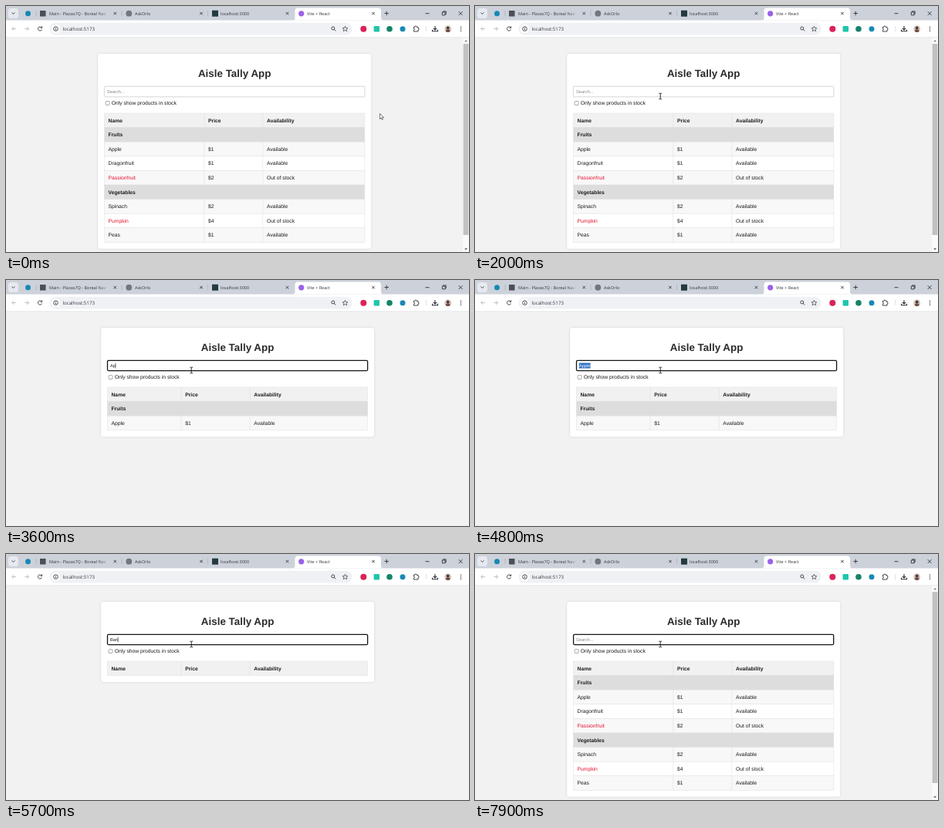
An HTML page that plays this animation: 600x319 px, repeating every 8 s.

```html
<!DOCTYPE html>
<html lang="en">
<head>
<meta charset="utf-8">
<title>Aisle Tally App</title>
<style>
  html, body { margin: 0; width: 100%; height: 100%; overflow: hidden; background: #f2f2f2; }
  svg { display: block; width: 600px; height: 319px; }
  text { font: 6.75px "Liberation Sans", Arial, sans-serif; fill: #1c1c1c; text-rendering: geometricPrecision; white-space: pre; }
  .ui { font: 5.5px "Open Sans", "Noto Sans", sans-serif; fill: #33363b; }
  .url { font-size: 6.15px; }
  .bold { font-weight: 700; }
  .title { font-size: 13.4px; font-weight: 700; fill: #2b2b2b; text-anchor: middle; }
  .field { font-size: 5.6px; }
  .hint { fill: #858585; }
  .out { fill: #e2142f; }
  .line { fill: none; stroke: #303338; stroke-width: .9; }
  .card { fill: #fff; filter: drop-shadow(0 0 1.6px rgba(0, 0, 0, .13)); }
</style>
</head>
<body>
<svg viewBox="0 0 600 319">
  <rect width="600" height="319" fill="#f2f2f2"/>
  <g id="page"></g>
  <g id="scrollbar">
    <path d="M592 41h8v278h-8z" fill="#fafafa"/>
    <path d="M592.6 49h6.8v248h-6.8z" fill="#c1c1c1"/>
    <path d="M594.3 46.2l1.8-2.2 1.8 2.2z" fill="#777"/>
    <path d="M594.3 314.3l1.8 2.2 1.8-2.2z" fill="#555"/>
  </g>
  <g id="chrome">
    <path d="M0 0h600v19H0z" fill="#cdd1da"/>
    <path d="M0 18.5h600V41H0z" fill="#fff"/>
    <path d="M0 40.7h600" stroke="#d9dbdf" stroke-width=".6"/>
    <path d="M371 18.6q3.5 0 3.5-3.6V6q0-3.5 3.5-3.5h104.500q3.500 0 3.500 3.500v9q0 3.600 3.500 3.600z" fill="#fff"/>
    <rect x="3" y="3" width="13" height="13" rx="3.6" fill="#e6e9ef"/>
    <path class="line" d="M7.500 8.500l2 2 2-2"/>
    <path d="M39 6v7M150 6v7M261.500 6v7" stroke="#a4a9b3" stroke-width=".6"/>
    <circle cx="28.500" cy="9.700" r="3.500" fill="#1689b5"/>
    <rect x="44" y="6" width="7.500" height="7.500" fill="#4b4f58"/>
    <circle cx="159.300" cy="9.700" r="3.900" fill="#72767d"/>
    <rect x="267" y="5.700" width="8" height="8" fill="#233b40"/>
    <circle cx="382.700" cy="9.800" r="3.600" fill="#9a62e8"/>
    <text class="ui" x="167" y="11.700">AskOrlo</text>
    <text class="ui" x="278" y="11.700">localhost:3000</text>
    <text class="ui" x="390" y="11.700">Vite + React</text>
    <text class="ui" x="56" y="11.700" style="fill:url(#fade)">Main - Plazas7Q - Boreal Nav</text>
    <linearGradient id="fade" gradientUnits="userSpaceOnUse" x1="118" x2="135">
      <stop stop-color="#33363b"/><stop offset="1" stop-color="#33363b" stop-opacity=".1"/>
    </linearGradient>
    <g id="closers"></g>
    <path class="line" d="M490.500 9.500h5.400M493.200 6.800v5.400"/>
    <path class="line" d="M543.500 9.700h5M565.300 8h3.800v3.800h-3.800zM566.500 8V6.900h3.700v3.700h-1M586.700 7.200l4.800 4.800M591.500 7.200l-4.800 4.800"/>
    <path class="line" style="stroke:#b9bcc1" d="M13 29.500H7.800M10.300 27l-2.500 2.500 2.500 2.500M24.300 29.500h5.200M27 27l2.500 2.500-2.500 2.500"/>
    <path class="line" d="M46.200 28a2.600 2.600 0 1 0 .3 2.400M46.700 26.400v2h-2"/>
    <rect x="56.500" y="21.800" width="392" height="15.800" rx="7.900" fill="#eff1f5"/>
    <circle cx="64.500" cy="29.600" r="5.700" fill="#fff"/>
    <circle class="line" cx="64.500" cy="29.600" r="2.800"/>
    <path class="line" d="M64.500 29.200v1.900M64.500 27.800v.6"/>
    <text class="ui url" x="73.500" y="31.900">localhost:5173</text>
    <circle class="line" cx="423.800" cy="28.900" r="2"/>
    <path class="line" d="M425.200 30.300l2.100 2.100"/>
    <path class="line" style="stroke-width:.7" d="M439.500 26.300l1 2.200 2.400.2-1.800 1.600.6 2.400-2.200-1.300-2.200 1.300.6-2.400-1.800-1.600 2.400-.2z"/>
    <circle cx="463.300" cy="29.700" r="4" fill="#dc2158"/>
    <rect x="476.600" y="26" width="7.400" height="7.400" rx=".8" fill="#20c6ac"/>
    <circle cx="497" cy="29.700" r="3.800" fill="#15836b"/>
    <circle cx="514" cy="29.700" r="3.500" fill="#1689b5"/>
    <path class="line" d="M528.300 27.200h1.700q0-1.300 1-1.300t1 1.300h2v1.800q1.200 0 1.200 1t-1.200 1v2h-5.700v-1.700q1.200 0 1.200-1.100t-1.200-1.100z"/>
    <path d="M544.500 26v7" stroke="#cbd6ec" stroke-width=".7"/>
    <path class="line" style="stroke-width:1.100" d="M556 26v4.800M553.800 28.800l2.200 2.200 2.200-2.200M552.500 30.800v2h7v-2"/>
    <clipPath id="round"><circle cx="572.700" cy="29.700" r="4.400"/></clipPath>
    <g clip-path="url(#round)">
      <path d="M568 25h10v10h-10z" fill="#cfc6bf"/>
      <circle cx="572.700" cy="28.400" r="1.900" fill="#51372f"/>
      <ellipse cx="572.700" cy="33.500" rx="3" ry="3.300" fill="#704b43"/>
    </g>
    <g fill="#303338"><circle cx="589.500" cy="27.200" r=".7"/><circle cx="589.500" cy="29.700" r=".7"/><circle cx="589.500" cy="32.200" r=".7"/></g>
  </g>
  <g id="pointer">
    <path id="arrow" d="M0 0v7l1.600-1.500 1.100 2.500 1.200-.5-1.100-2.400h2.200z" fill="#fff" stroke="#222" stroke-width=".6"/>
    <path id="beam" d="M-1.800-3.800h1.300l.5.500.5-.5h1.300M0-3.300v6.600M-1.800 3.800h1.300l.5-.5.500.500h1.300" fill="none" stroke="#111" stroke-width=".9"/>
  </g>
</svg>
<script>
const LOOP = 8000, FOCUS = 2600, ROW = 18.6, TOP = 139;
const $ = id => document.getElementById(id);

const stock = [
  ["Fruits", [["Apple", 1, true], ["Dragonfruit", 1, true], ["Passionfruit", 2, false]]],
  ["Vegetables", [["Spinach", 2, true], ["Pumpkin", 4, false], ["Peas", 1, true]]]
];

// [time, query, selected]
const edits = [
  [0, ""], [3300, "A"], [3500, "Ap"], [3800, "App"], [4000, "Appl"], [4200, "Apple"],
  [4600, "Apple", true], [5000, ""],
  [5300, "B"], [5500, "Ba"], [5600, "Ban"], [5900, "Bana"], [6000, "Banan"], [6200, "Banana"],
  [6700, "Banana", true], [7300, ""]
];

const rect = (x, y, w, h, fill, extra = "") =>
  `<rect x="${x}" y="${y}" width="${w}" height="${h}" fill="${fill}" ${extra}/>`;
const text = (x, y, s, cls = "") => `<text x="${x}" y="${y}" class="${cls}">${s}</text>`;

function visibleRows(query) {
  const q = query.toLowerCase();
  return stock.flatMap(([group, items]) => {
    const hits = items.filter(([name]) => name.toLowerCase().includes(q));
    return hits.length ? [[group], ...hits] : [];
  });
}

function table(left, rows) {
  const wide = rows.some(r => r[2] === false);
  const cols = wide ? [0, 129.5, 205.5] : [0, 95.7, 184.8];
  const width = 337.5;
  let out = "";
  const line = (cells, i, fill, cls) => {
    const y = TOP + i * ROW;
    out += rect(left, y, width, ROW, fill, 'stroke="#e0e0e0" stroke-width=".5"');
    cells.forEach((cell, c) => {
      if (c) out += rect(left + cols[c] - .25, y, .5, ROW, "#dcdcdc");
      out += text(left + cols[c] + 5.2, y + 11.6, cell, c && cls === "out" ? "" : cls);
    });
  };
  line(["Name", "Price", "Availability"], 0, "#f1f1f1", "bold");
  rows.forEach(([name, price, inStock], i) => {
    if (!price) return line([name], i + 1, "#dddddd", "bold");
    line([name, "$" + price, inStock ? "Available" : "Out of stock"], i + 1,
      i % 2 ? "#f8f8f9" : "#fff", inStock ? "" : "out");
  });
  return out;
}

const pen = document.createElement("canvas").getContext("2d");
pen.font = '56px "Liberation Sans", Arial, sans-serif';
const fieldWidth = s => pen.measureText(s).width / 10;

function field(left, query, selected, focused, caret) {
  const x = left + 3.7, w = fieldWidth(query);
  let out = focused
    ? rect(left + .2, 104.3, 337.1, 13.4, "#fff", 'rx="1.5" stroke="#151515" stroke-width="1.3"')
    : rect(left, 104.2, 337.5, 13.6, "#fff", 'rx="1" stroke="#c4c4c4" stroke-width=".7"');
  if (selected) out += rect(x - .2, 107.5, w + .4, 7, "#2f6fc4");
  out += `<g${selected ? ' style="--ink:#fff"' : ""}>` +
    `<text class="field ${query ? "" : "hint"}" x="${x}" y="113"${selected ? ' style="fill:#fff"' : ""}>${query || "Search..."}</text></g>`;
  if (caret) out += rect(x + w - .2, 107.6, .6, 6.8, "#111");
  return out;
}

function drawPage(query, selected, focused, caret) {
  const rows = visibleRows(query), full = rows.length === 8;
  const left = full ? 127.4 : 131.3;
  const height = TOP + (rows.length + 1) * ROW + 8.4 - 62;
  $("scrollbar").style.display = full ? "" : "none";
  $("page").innerHTML =
    rect(left - 8.2, 62, 354, height, "#fff", 'class="card" rx="3.4"') +
    text(left + 168.8, 91.6, "Aisle Tally App", "title") +
    field(left, query, selected, focused, caret) +
    rect(left + 1.8, 123.6, 4.9, 4.9, "#fff", 'rx=".9" stroke="#707070" stroke-width=".6"') +
    text(left + 9.4, 128.4, "Only show products in stock") +
    table(left, rows);
}

function movePointer(t) {
  const p = Math.min(1, Math.max(0, (t - 400) / 1300));
  const e = p * p * (3 - 2 * p);
  const x = 484.5 - 244.3 * e, y = 139.5 - 22.5 * e;
  const overField = y < 118;
  $("pointer").setAttribute("transform", `translate(${x} ${y})`);
  $("arrow").style.display = overField ? "none" : "";
  $("beam").style.display = overField ? "" : "none";
}

$("closers").innerHTML = [141.3, 253, 364.5, 476].map(x =>
  `<path class="line" d="M${x - 1.7} 7.900l3.400 3.400m0-3.400l-3.400 3.400"/>`).join("");

let shown = "";
function frame(now) {
  const t = Math.floor(now % LOOP / 100) * 100;
  const [since, query, selected] = edits.filter(e => e[0] <= t).pop();
  const focused = t >= FOCUS;
  const caret = focused && !selected && (t - Math.max(since, FOCUS)) % 1060 < 530;
  const key = [query, selected, focused, caret].join();
  if (key !== shown) drawPage(query, selected, focused, caret);
  shown = key;
  movePointer(t);
  requestAnimationFrame(frame);
}
const start = performance.now();
frame(0);
function tick() { return performance.now() - start; }
</script>
</body>
</html>
```
